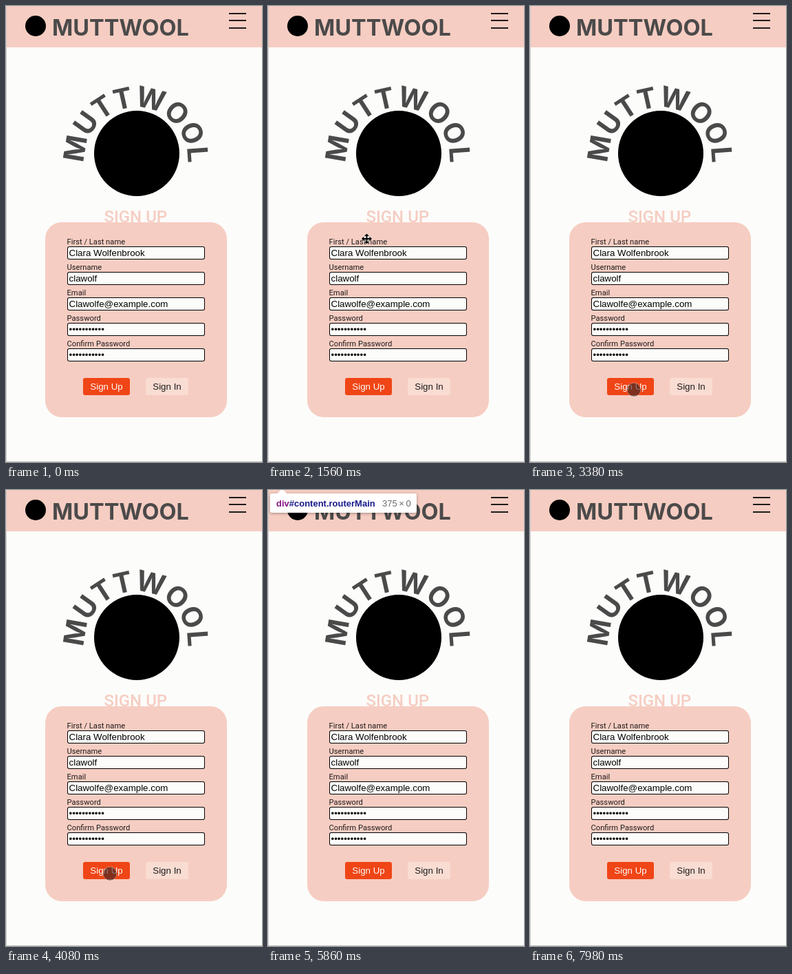
These frames come from a looping animation (372 px wide and 662 px high, 8 s). An HTML page with a canvas:

```html
<!DOCTYPE html>
<html lang="en">
<head>
<meta charset="utf-8">
<title>Sign up</title>
<style>
html, body { margin: 0; width: 100%; height: 100%; overflow: hidden; background: #fcfcfa; }
canvas { display: block; width: 372px; height: 662px; }
</style>
</head>
<body>
<canvas id="stage"></canvas>
<script>
const W = 372, H = 662, LOOP = 8000;
const PAPER = '#fcfcfa', PEACH = '#f6cdc2', INK = '#4b4a4a', DARK = '#1f1b1b';
const BRAND = 'MUTTWOOL';
const ROBOTO = 'Roboto, sans-serif';
const ARIAL = '"Liberation Sans", Arial, sans-serif';
const INTER = 'Inter, sans-serif';

const canvas = document.getElementById('stage');
const ctx = canvas.getContext('2d');
const ratio = window.devicePixelRatio || 1;
canvas.width = W * ratio;
canvas.height = H * ratio;

const fields = [
  ['First / Last name', 'Clara Wolfenbrook'],
  ['Username', 'clawolf'],
  ['Email', 'Clawolfe@example.com'],
  ['Password', '•'.repeat(11)],
  ['Confirm Password', '•'.repeat(11)]
];

// Pointer path: time, x, y
const path = [
  [420, 158, 672], [720, 154, 618], [1450, 143, 324], [2200, 151, 559],
  [2500, 151, 559], [3300, 151, 557], [4100, 151, 557], [4760, 153, 567],
  [5300, 152, 674]
];
const TOUCH_FROM = 2500;
const TIP_FROM = 5860, TIP_TO = 6220;

function rect(x, y, w, h, color) {
  ctx.fillStyle = color;
  ctx.fillRect(x, y, w, h);
}

function roundRect(x, y, w, h, r, color) {
  ctx.beginPath();
  ctx.roundRect(x, y, w, h, r);
  ctx.fillStyle = color;
  ctx.fill();
}

function disc(x, y, r, color) {
  ctx.beginPath();
  ctx.arc(x, y, r, 0, Math.PI * 2);
  ctx.fillStyle = color;
  ctx.fill();
}

function text(str, x, y, font, color, align = 'left') {
  ctx.font = font;
  ctx.textAlign = align;
  ctx.fillStyle = color;
  ctx.fillText(str, x, y);
}

function header() {
  rect(1, 0, W - 1, 60, PEACH);
  disc(43, 29, 15, '#000');
  text(BRAND, 67, 43, '700 32.5px ' + INTER, INK);
  for (let i = 0; i < 3; i++) rect(324, Math.floor(10 + i * 10.5), 25, 2, DARK);
}

function arcText(str, cx, cy, radius, span, font) {
  ctx.font = font;
  const widths = [...str].map(c => ctx.measureText(c).width);
  const total = widths.reduce((a, b) => a + b, 0);
  let pos = 0;
  [...str].forEach((c, i) => {
    const angle = ((pos + widths[i] / 2) / total - 0.5) * span;
    ctx.save();
    ctx.translate(cx, cy);
    ctx.rotate(angle);
    text(c, 0, -radius, font, INK, 'center');
    ctx.restore();
    pos += widths[i];
  });
}

function emblem() {
  arcText(BRAND, 189, 222, 75, Math.PI * 1.05, '700 41px ' + INTER);
  disc(190, 214, 62, '#000');
}

function button(label, x, w, fill, color) {
  roundRect(x, 540, w, 25, 3, fill);
  text(label, x + w / 2, 557, '13.33px ' + ARIAL, color, 'center');
}

function form() {
  text('SIGN UP', 142.5, 314, '500 24px ' + ROBOTO, PEACH);
  roundRect(57, 314, 264, 283, 24, PEACH);
  fields.forEach(([label, value], i) => {
    const y = 349 + i * 37;
    text(label, 88.5, y - 3, '11.2px ' + ROBOTO, DARK);
    roundRect(89, y, 200, 19, 3, '#000');
    roundRect(90, y + 1, 198, 17, 2, PAPER);
    text(value, 91.5, y + 14, '13.33px ' + ARIAL, '#000');
  });
  button('Sign Up', 112, 68, '#f04516', PAPER);
  button('Sign In', 203, 62, '#f9dcd2', DARK);
}

function pointerAt(t) {
  const n = path.findIndex(p => p[0] > t);
  if (n < 1) return null;
  const a = path[n - 1], b = path[n];
  const u = (t - a[0]) / (b[0] - a[0]);
  const k = u * u * (3 - 2 * u);
  return [a[1] + (b[1] - a[1]) * k, a[2] + (b[2] - a[2]) * k];
}

function moveIcon(x, y) {
  const shape = new Path2D();
  shape.rect(-5, -1, 10, 2);
  shape.rect(-1, -5, 2, 10);
  for (let i = 0; i < 4; i++) {
    const c = [1, 0, -1, 0][i], s = [0, 1, 0, -1][i];
    shape.moveTo(c * 7.5, s * 7.5);
    shape.lineTo(c * 4 - s * 3.5, s * 4 + c * 3.5);
    shape.lineTo(c * 4 + s * 3.5, s * 4 - c * 3.5);
    shape.closePath();
  }
  ctx.save();
  ctx.translate(x, y);
  ctx.strokeStyle = '#fff';
  ctx.lineWidth = 1;
  ctx.stroke(shape);
  ctx.fillStyle = '#000';
  ctx.fill(shape);
  ctx.restore();
}

function touchDot(x, y) {
  disc(x, y, 10, 'rgba(50, 35, 35, 0.6)');
  ctx.strokeStyle = 'rgba(255, 225, 215, 0.4)';
  ctx.lineWidth = 1;
  ctx.stroke();
}

function tooltip() {
  ctx.save();
  ctx.shadowColor = 'rgba(0, 0, 0, 0.35)';
  ctx.shadowBlur = 4 * ratio;
  ctx.shadowOffsetY = ratio;
  roundRect(3, 5, 213, 28, 3, '#fff');
  ctx.restore();
  ctx.beginPath();
  ctx.moveTo(13, 6);
  ctx.lineTo(20.5, -2);
  ctx.lineTo(28, 6);
  ctx.fillStyle = '#fff';
  ctx.fill();
  const bold = 'bold 13px ' + ARIAL;
  text('div', 12, 24, bold, '#881280');
  text('#content.routerMain', 12 + ctx.measureText('div').width, 24, bold, '#1a1a8c');
  text('375\u2009×\u20090', 166, 24, '13px ' + ARIAL, '#6a6a6a');
}

function draw(t) {
  ctx.setTransform(ratio, 0, 0, ratio, 0, 0);
  rect(0, 0, W, H, PAPER);
  header();
  emblem();
  form();
  rect(0, 0, 1, H, '#cfcecb');
  rect(0, H - 1, W, 1, '#c3c2c0');
  const p = pointerAt(t);
  if (p) (t < TOUCH_FROM ? moveIcon : touchDot)(p[0], p[1]);
  if (t >= TIP_FROM && t < TIP_TO) tooltip();
}

const start = performance.now();
function tick() {
  draw((performance.now() - start) % LOOP);
  requestAnimationFrame(tick);
}
tick();
</script>
</body>
</html>
```
